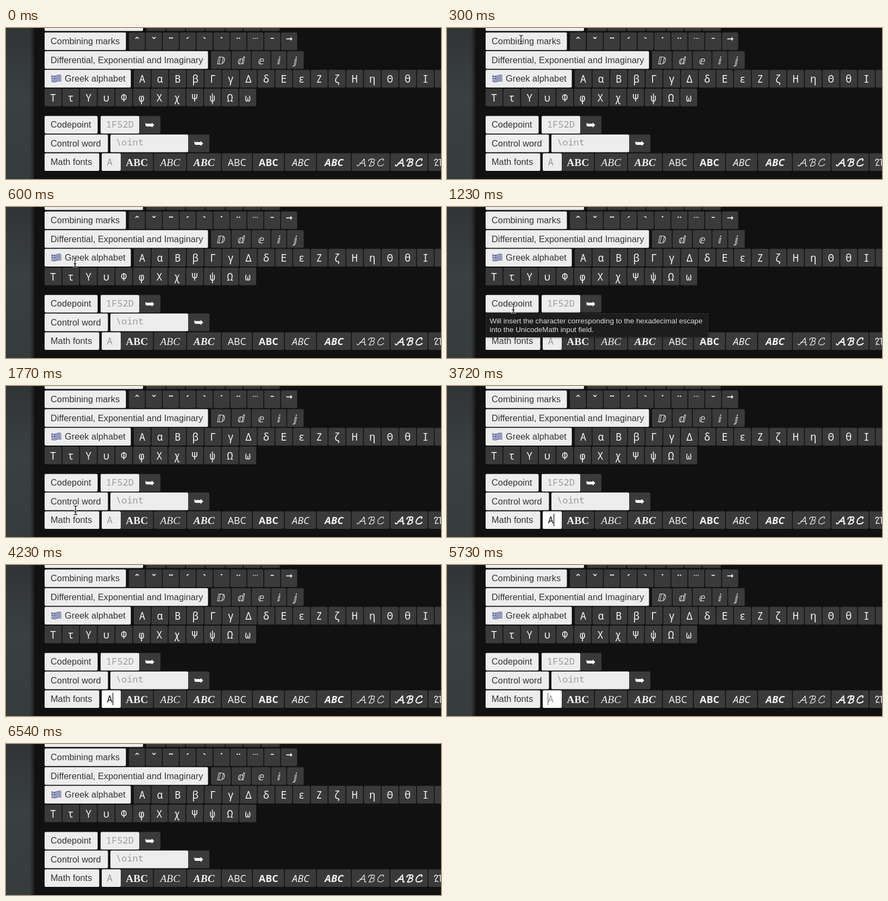
An HTML page with a canvas that plays this animation: 800 px wide and 279 px high, repeating every 6.74 s.

```html
<!DOCTYPE html>
<html lang="en">
<head>
<meta charset="utf-8">
<title>Math keyboard</title>
<style>
  html, body { margin: 0; width: 100%; height: 100%; overflow: hidden; background: #111; }
  canvas { display: block; width: 800px; height: 279px; }
</style>
</head>
<body>
<canvas id="stage" width="800" height="279"></canvas>
<script>
const LOOP = 6740;
const SANS = '"Liberation Sans", sans-serif';
const HUMAN = '"Noto Sans", sans-serif';
const SERIF = '"Liberation Serif", serif';
const MONO = '"Noto Sans Mono", monospace';
const SYMBOL = '"DejaVu Sans", sans-serif';
const KEY = '#3a3a3a', INK = '#f0f0f0', HINT = '#9c9c9c', PAPER = '#ededed';
const ROW = { marks: 8.2, diff: 42.8, greek: 77.3, greek2: 111.9, code: 162.4, word: 196.8, fonts: 231.4 };
const ROW_HEIGHT = 32.6, GAP = 1.5;

const canvas = document.getElementById('stage');
let ctx = canvas.getContext('2d');

function box(x0, y, x1, color, h = ROW_HEIGHT) {
  ctx.fillStyle = color;
  ctx.beginPath();
  ctx.roundRect(x0, y, x1 - x0, h, 2);
  ctx.fill();
}

function text(str, x, y, font, color = INK, align = 'left') {
  ctx.font = font;
  ctx.fillStyle = color;
  ctx.textAlign = align;
  ctx.fillText(str, x, y);
}

function stroke(path, x, y, width, color = INK) {
  ctx.save();
  ctx.translate(x, y);
  ctx.strokeStyle = color;
  ctx.lineWidth = width;
  ctx.lineCap = ctx.lineJoin = 'round';
  ctx.stroke(new Path2D(path));
  ctx.restore();
}

function label(str, y, right, x = 82) {
  box(71, y, right + 0.5, PAPER);
  text(str, x, y + 22, '16.35px ' + SANS, '#343434');
}

// Keys sit between consecutive edges with a small gap.
function keys(y, edges, drawGlyph) {
  for (let i = 0; i < edges.length - 1; i++) {
    const left = edges[i], right = edges[i + 1] - GAP;
    box(left, y, right, KEY);
    drawGlyph((left + right) / 2, i);
  }
}

const steps = (start, pitch, count) =>
  Array.from({ length: count + 1 }, (_, i) => start + i * pitch);

function greekKeys(letters, start, y) {
  keys(y, steps(start, 32.55, letters.length), (x, i) =>
    text(letters[i], x, y + 23.8, '19px ' + MONO, INK, 'center'));
}

function flag(x, y) {
  for (let col = 0; col < 18; col++) {
    const top = y + Math.sin(col / 18 * Math.PI * 2);
    for (let band = 0; band < 9; band++) {
      const cross = col < 7 && band < 5;
      const white = cross ? band === 2 || col === 3 : band % 2;
      ctx.fillStyle = white ? '#d4d6e2' : '#28307c';
      ctx.fillRect(x + col, top + band * 1.3, 1.1, 1.35);
    }
  }
}

function goKey(x0, x1, y) {
  box(x0, y, x1, KEY);
  text('➥', (x0 + x1) / 2, y + 23.5, '22px ' + SYMBOL, '#fff', 'center');
}

function script(x, y, width) {
  stroke('M0 11 q0 3 3 1 q4 -4 10 -12 l1 13 q1 1 2 -1 M5 8 h9', x, y, width);
  stroke('M2 4 q0 -4 7 -4 q5 0 4 3 q-1 3 -5 3 q6 0 4 4 q-2 4 -9 3 M8 1 q-2 8 -5 12', x + 19, y, width);
  stroke('M12 3 q2 -3 -1 -3 q-6 0 -9 8 q-1 5 4 5 q4 0 7 -3', x + 36, y, width);
}

function backdrop() {
  ctx.fillStyle = '#111';
  ctx.fillRect(0, 0, 800, 279);
  const wall = ctx.createLinearGradient(0, 0, 0, 279);
  wall.addColorStop(0, '#303434');
  wall.addColorStop(0.45, '#3a3f3f');
  wall.addColorStop(1, '#363b3b');
  ctx.fillStyle = wall;
  ctx.fillRect(0, 0, 52, 279);
  const shade = ctx.createLinearGradient(44, 0, 52, 0);
  shade.addColorStop(0, 'rgba(17,17,17,0)');
  shade.addColorStop(1, 'rgba(17,17,17,.7)');
  ctx.fillStyle = shade;
  ctx.fillRect(44, 0, 8, 279);
}

function keyboard() {
  backdrop();
  box(71, -27, 252, PAPER);
  keys(-27, [258, 295, 331, 367, 404, 437, 470, 505], () => {});

  label('Combining marks', ROW.marks, 220);
  const marks = 'ˆˇ˜´`˙¨…ˉ→';
  keys(ROW.marks, steps(226, 31.1, 10), (x, i) => {
    const raised = marks[i] === '…', arrow = marks[i] === '→';
    const font = raised ? 'bold 11px ' + SANS
      : arrow ? 'bold 15px ' + SYMBOL : 'bold 20px ' + SANS;
    text(marks[i], x, raised ? 20 : arrow ? 25 : 32, font, INK, 'center');
  });

  label('Differential, Exponential and Imaginary', ROW.diff, 371);
  keys(ROW.diff, [377, 415, 452, 488, 517, 549], (x, i) =>
    text('ⅅⅆⅇⅈⅉ'[i], x, ROW.diff + 24, '19px ' + SYMBOL, INK, 'center'));

  label('Greek alphabet', ROW.greek, 229, 108);
  flag(83.5, 87.5);
  greekKeys('ΑαΒβΓγΔδΕεΖζΗηΘθΙι', 235, ROW.greek);
  greekKeys('ΤτΥυΦφΧχΨψΩω', 71, ROW.greek2);

  label('Codepoint', ROW.code, 168);
  box(174, ROW.code, 245, PAPER);
  text('1F52D', 184, ROW.code + 21.5, '17px ' + MONO, HINT);
  goKey(245, 284, ROW.code);

  label('Control word', ROW.word, 187);
  box(192, ROW.word, 335, PAPER);
  text('\\oint', 202, ROW.word + 20.5, '17px ' + MONO, HINT);
  goKey(335, 374, ROW.word);

  label('Math fonts', ROW.fonts, 171);
  const styles = [
    'bold 19.4px ' + SERIF, 'italic 19.4px ' + SERIF, 'italic bold 19.4px ' + SERIF,
    '17.6px ' + HUMAN, 'bold 18px ' + HUMAN, 'italic 18px ' + HUMAN, 'italic bold 18.6px ' + HUMAN
  ];
  keys(ROW.fonts, [211, 272, 333, 397, 454, 513, 572, 636, 707, 777, 846], (x, i) => {
    if (i < 7) text('ABC', x, ROW.fonts + 23.8, styles[i], INK, 'center');
    else if (i < 9) script(x - 25, ROW.fonts + 10.5, i === 7 ? 1.2 : 2.1);
    else stroke('M1 4 q1 -4 4 -3 q3 2 0 5 q-4 4 -1 6 M2 13 q3 -2 6 0 M8 2 l4 -1 v11 q1 2 3 0',
      787, ROW.fonts + 10, 1.4);
  });
}

function tooltip() {
  ctx.save();
  ctx.shadowColor = 'rgba(0,0,0,.5)';
  ctx.shadowBlur = 4;
  box(71, 196, 481, '#1d1d1d', 45);
  ctx.restore();
  ctx.strokeStyle = '#2c2c2c';
  ctx.lineWidth = 1;
  ctx.strokeRect(71.5, 196.5, 409, 44);
  const font = '13.4px ' + SANS;
  text('Will insert the character corresponding to the hexadecimal escape', 78.5, 215, font, '#dcdcdc');
  text('into the UnicodeMath input field.', 78.5, 231, font, '#dcdcdc');
}

// Pointer stops: time, x, y.
const route = [
  [150, 140, -12], [570, 127, 102], [720, 127, 102], [1130, 122, 187],
  [1330, 122, 187], [1650, 126, 214], [1900, 130, 247], [2220, 188, 252], [3450, 188, 252]
];

function pointer(t) {
  const i = route.findIndex(stop => stop[0] > t);
  if (i < 1) return;
  const [t0, x0, y0] = route[i - 1], [t1, x1, y1] = route[i];
  const p = (t - t0) / (t1 - t0), ease = p * p * (3 - 2 * p);
  const x = x0 + (x1 - x0) * ease, y = y0 + (y1 - y0) * ease;
  const beam = 'M-3 -8 Q0 -8 0 -6 Q0 -8 3 -8 M0 -6 V6 M-3 8 Q0 8 0 6 Q0 8 3 8 M-2 3 H2';
  stroke(beam, x, y, 3, '#fff');
  stroke(beam, x, y, 1.3, '#111');
}

function fontField(t) {
  const focused = t >= 2500 && t < 6420;
  const typed = t >= 3480 && t < 5730;
  const caret = focused && (t < 2970 || t >= 3480);
  box(176, ROW.fonts, 211, focused ? '#fff' : PAPER);
  text('A', 185.5, 254, '17.5px ' + MONO, typed ? '#151515' : HINT);
  if (caret) {
    ctx.fillStyle = typed ? '#111' : '#777';
    ctx.fillRect(typed ? 196 : 185, 236, 1.2, 23);
  }
}

// The keyboard never changes, so it is painted once.
const screen = ctx;
const still = document.createElement('canvas');
still.width = 800;
still.height = 279;
ctx = still.getContext('2d');
keyboard();
ctx = screen;

const began = performance.now();
function frame() {
  const t = (performance.now() - began) % LOOP;
  ctx.drawImage(still, 0, 0);
  fontField(t);
  if (t >= 1050 && t < 1410) tooltip();
  pointer(t);
  requestAnimationFrame(frame);
}
frame();
</script>
</body>
</html>
```
